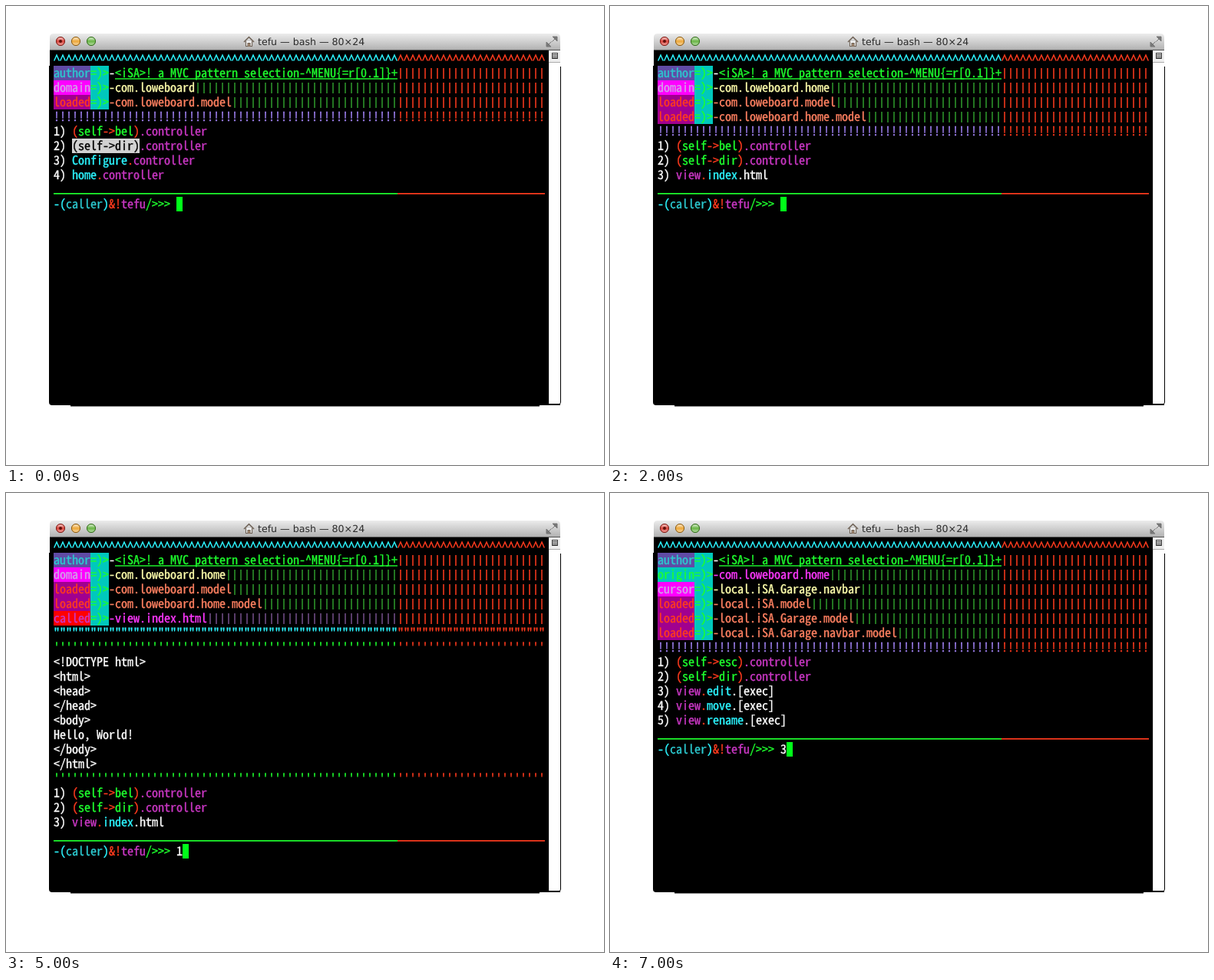
Animation, 779 px wide and 599 px high, one loop 8 s. Source, as an HTML page:

```html
<!DOCTYPE html>
<html lang="en">
<head>
<meta charset="utf-8">
<title>Terminal</title>
<style>
html, body { margin: 0; width: 100%; height: 100%; overflow: hidden; background: #fff; }
svg { display: block; }
text { white-space: pre; text-rendering: geometricPrecision; }
#title { font: 12.6px "DejaVu Sans", sans-serif; fill: #2b2b2b; }
</style>
</head>
<body>
<svg width="779" height="599" viewBox="0 0 779 599">
  <defs>
    <linearGradient id="bar" x2="0" y2="1">
      <stop offset="0" stop-color="#ececec"/><stop offset="1" stop-color="#b2b2b2"/>
    </linearGradient>
    <linearGradient id="gloss" x2="0" y2="1">
      <stop offset="0" stop-color="#fff" stop-opacity=".75"/>
      <stop offset=".5" stop-color="#fff" stop-opacity="0"/>
      <stop offset="1" stop-color="#fff" stop-opacity=".5"/>
    </linearGradient>
  </defs>
  <path d="M57 58H707V519H722V521H695V522.5H84V521H60Q56 521 56 517V78H57Z"/>
  <path d="M707 58H722V519H707Z" fill="#fff"/>
  <path d="M722.5 79V517Q722.5 520 719 520.5" fill="none" stroke="#000"/>
  <path d="M57 57V41Q57 36 62 36H717Q722 36 722 41V57Z" fill="url(#bar)"/>
  <path d="M57 57.5H722" stroke="#555"/>
  <g id="lights"></g>
  <g fill="#f4f4f4" stroke="#6d6054" stroke-width="1.1">
    <path d="M312.5 46V52.5H320.5V46"/>
    <path d="M310 47L316.500 40.500L323 47" fill="none" stroke-width="1.5"/>
    <path d="M315 52.500V48.500H318V52.500" fill="#a98b70"/>
  </g>
  <text id="title" x="328" y="51">tefu — bash — 80×24</text>
  <g fill="#777" stroke="#777" stroke-width="1.3">
    <path d="M712 40H718V46ZM715 43L711.500 46.500" stroke-width="1"/>
    <path d="M704 47V53H710ZM707 50L710.500 46.500" stroke-width="1"/>
  </g>
  <path d="M707.5 58V519" stroke="#ddd"/>
  <rect x="707" y="58" width="15" height="15" fill="#eee"/>
  <path d="M707 73.500H722" stroke="#aaa"/>
  <rect x="711.5" y="61.5" width="7" height="7" fill="#ddd" stroke="#444"/>
  <path d="M712 63.500H718M712 65.500H718M712 67.500H718" stroke="#555"/>
  <g id="screen"></g>
</svg>
<script>
const CELL = 8, LINE = 19, LEFT = 62, TOP = 59, COLS = 80, SPLIT = 56;
const FONT = '"Noto Sans Mono CJK JP", "DejaVu Sans Mono", monospace';
const C = {
  white: '#fff', red: '#ff3b1e', green: '#1eff2e', lime: '#00ff19', cyan: '#2cf5ff',
  aqua: '#2cc9cf', pink: '#c937c3', magenta: '#ff38ff', yellow: '#ffffac',
  salmon: '#ff8161', violet: '#a283f5', pipe: '#2f9c2d', plum: '#76508c',
  lilac: '#d0a3e8', teal: '#00c8bd', indigo: '#604ba5', fuchsia: '#ff00ff',
  purple: '#a1008f', hot: '#ff0000', grey: '#d2d2d2', black: '#000'
};
const screen = document.getElementById('screen');

// Choose the size at which one character fills one cell.
const pen = document.createElement('canvas').getContext('2d');
pen.font = '100px ' + FONT;
screen.style.fontFamily = FONT;
screen.style.fontSize = CELL * 100 / pen.measureText('0').width + 'px';

const esc = s => s.replace(/&/g, '&amp;').replace(/</g, '&lt;');
const rect = (x, y, w, h, fill) =>
  `<rect x="${x}" y="${y}" width="${w}" height="${h}" fill="${fill}"/>`;

// Runs are [colour, text, background, underlined].
const run = (color, text, bg, line) => [color, text, bg, line];
const rule = (ch, color) =>
  [run(color, ch.repeat(SPLIT)), run('red', ch.repeat(COLS - SPLIT))];

function field(label, ink, bg, value, color, pipe = 'pipe') {
  const gap = SPLIT - 10 - value.length;
  return [
    run(ink, label, bg), run('green', '=)>', 'teal'), run(color, '-' + value),
    run(pipe, '|'.repeat(gap)), run('red', '|'.repeat(COLS - SPLIT))
  ];
}
const author = [
  run('aqua', 'author', 'indigo'), run('green', '=)>', 'teal'), run('white', '-'),
  run('green', '<iSA>! a MVC pattern selection-^MENU{=r[0.1]}+', null, true),
  run('red', '|'.repeat(COLS - SPLIT))
];
const domain = value => field('domain', 'lilac', 'fuchsia', value, 'yellow');
const loaded = value => field('loaded', 'red', 'purple', value, 'salmon');

const self = name => [
  run('red', '('), run('green', 'self'), run('red', '->'), run('green', name),
  run('red', ')'), run('pink', '.controller')
];
const picked = [run('black', '(self->dir)', 'grey'), run('pink', '.controller')];
const control = name => [run('cyan', name), run('red', '.'), run('pink', 'controller')];
const view = (name, tail) =>
  [run('pink', 'view'), run('red', '.'), run('cyan', name), run('white', tail)];
const menu = (...items) => items.map((item, i) => [run('white', `${i + 1}) `), ...item]);

const caret = rule('^', 'cyan'), bang = rule('!', 'violet');
const quote = rule('"', 'cyan'), tick = rule("'", 'green');
const prompt = [
  run('cyan', '-('), run('aqua', 'caller'), run('cyan', ')'), run('red', '&!'),
  run('pink', 'tefu'), run('green', '/>>>'), run('white', ' ')
];
const page = (...rows) => [caret, author, ...rows, rule('_', 'green'), prompt];

const board = page(
  domain('com.loweboard'), loaded('com.loweboard.model'), bang,
  ...menu(self('bel'), picked, control('Configure'), control('home'))
);
const homeHead = [
  domain('com.loweboard.home'), loaded('com.loweboard.model'),
  loaded('com.loweboard.home.model')
];
const homeMenu = menu(self('bel'), self('dir'), view('index', '.html'));
const home = page(...homeHead, bang, ...homeMenu);
const html = ['<!DOCTYPE html>', '<html>', '<head>', '</head>', '<body>',
  'Hello, World!', '</body>', '</html>'].map(s => [run('white', s)]);
const index = page(
  ...homeHead, field('called', 'pink', 'hot', 'view.index.html', 'magenta', 'plum'),
  quote, tick, ...html, tick, ...homeMenu
);
const navbar = page(
  field('origin', 'green', 'teal', 'com.loweboard.home', 'magenta'),
  field('cursor', 'lilac', 'fuchsia', 'local.iSA.Garage.navbar', 'yellow'),
  loaded('local.iSA.model'), loaded('local.iSA.Garage.model'),
  loaded('local.iSA.Garage.navbar.model'), bang,
  ...menu(self('esc'), self('dir'), view('edit', '.[exec]'),
    view('move', '.[exec]'), view('rename', '.[exec]'))
);

// One step per second: page and typed key.
const steps = [
  [board, ''], [board, '4'], [home, ''], [home, '3'],
  [index, ''], [index, '1'], [navbar, ''], [navbar, '3']
];

// Rows of carets, bars and underscores follow the cell grid.
function strokes(ch, n, x, y, color) {
  if (ch === '_') return rect(x, y + 14, n * CELL, 1.7, color);
  let d = '';
  for (let i = 0; i < n; i++) {
    const cx = x + i * CELL + 4;
    d += ch === '^' ? `M${cx - 3.3} ${y + 12.5}L${cx} ${y + 5}L${cx + 3.3} ${y + 12.5}`
      : `M${cx} ${y + 3}V${y + 17}`;
  }
  return `<path d="${d}" fill="none" stroke="${color}" stroke-width="1.5"/>`;
}

function drawRun([name, text, bg, line], x, y) {
  const color = C[name], w = text.length * CELL;
  let out = bg ? rect(x, y, w, LINE, C[bg]) : '';
  if (line) out += rect(x, y + 16.3, w, 1.4, color);
  if ('^|_'.includes(text[0])) return out + strokes(text[0], text.length, x, y, color);
  return out + `<text x="${x}" y="${y + 15}" fill="${color}" stroke="${color}" ` +
    `stroke-width=".35">${esc(text)}</text>`;
}

function drawPage([rows, key]) {
  let out = '';
  rows.forEach((row, r) => {
    const y = TOP + r * LINE;
    let x = LEFT;
    const runs = row === prompt ? [...row, run('white', key)] : row;
    for (const part of runs) {
      if (!part[1]) continue;
      out += drawRun(part, x, y);
      x += part[1].length * CELL;
    }
    if (row === prompt) out += rect(x, y, CELL, LINE, C.lime);
  });
  screen.innerHTML = out;
}

document.getElementById('lights').innerHTML =
  [['#d9433a', '#7d1e18'], ['#eda83a', '#8a5c16'], ['#69b545', '#386e22']]
    .map(([fill, edge], i) => {
      const at = `cx="${71 + i * 20}" cy="46"`;
      return `<circle ${at} r="5.6" fill="${fill}" stroke="${edge}"/>` +
        `<circle ${at} r="4.8" fill="url(#gloss)"/>` +
        (i ? '' : `<circle ${at} r="2" fill="#5c0f0b"/>`);
    }).join('');

let shown = -1;
function update(t) {
  const step = Math.floor(t % 8000 / 1000);
  if (step !== shown) drawPage(steps[shown = step]);
}
const start = performance.now();
function tick60(now) {
  update(Math.max(0, now - start));
  requestAnimationFrame(tick60);
}
update(0);
requestAnimationFrame(tick60);
</script>
</body>
</html>
```
